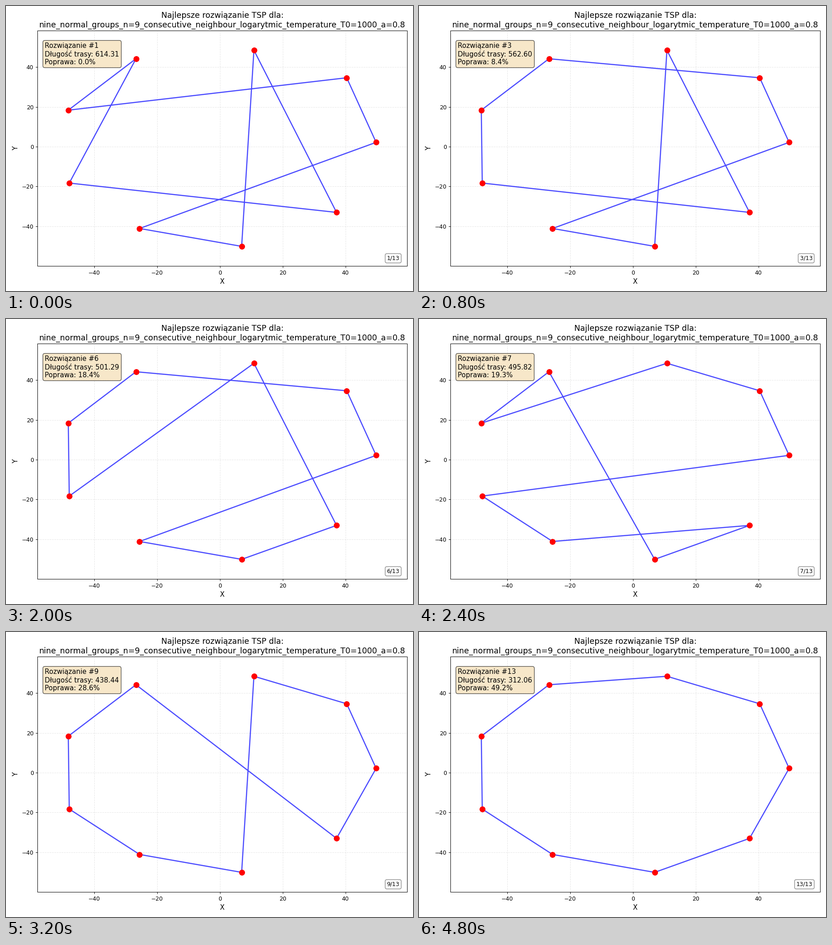
These frames come from a looping animation (894 px wide and 626 px high, 5.2 s). A matplotlib script:

```python
import matplotlib.pyplot as plt
from matplotlib.animation import FuncAnimation

W, H, DPI = 894, 626, 89.4
LEFT, RIGHT, TOP, BOTTOM = 69.2, 880.6, 54.2, 571.0  # plot area in pixels

CITIES = {
    "A": (-26.68, 44.15), "B": (-48.23, 18.33), "C": (-47.92, -18.27),
    "D": (-25.53, -41.07), "E": (6.96, -50.05), "F": (37.17, -33.0),
    "G": (49.77, 2.17), "H": (40.41, 34.6), "I": (10.87, 48.4),
}

# visiting order and tour length of each successive best solution
TOURS = [
    ("ABHGDEIFC", 614.31),
    ("ABCFEIDGH", 574.60),
    ("ABCFIEDGH", 562.60),
    ("ABCFIDEGH", 541.35),
    ("ABCIFDEGH", 510.50),
    ("ABCIFEDGH", 501.29),
    ("BAEFDCGHI", 495.82),
    ("ABEFDCGHI", 455.16),
    ("ABCDEIHGF", 438.44),
    ("ABCDEGHFI", 428.24),
    ("ABCDEGFHI", 378.94),
    ("ABDCEFGHI", 368.71),
    ("ABCDEFGHI", 312.06),
]

plt.rcParams["font.family"] = "DejaVu Sans"
fig, ax = plt.subplots(figsize=((W + 1e-6) / DPI, (H + 1e-6) / DPI), dpi=DPI)
fig.subplots_adjust(left=LEFT / W, right=RIGHT / W,
                    top=1 - TOP / H, bottom=1 - BOTTOM / H)

route, = ax.plot([], [], "b-", linewidth=2, alpha=0.7)
ax.plot(*zip(*CITIES.values()), "ro", markersize=9.4)
ax.margins(0.1)
ax.grid(True, linestyle="--", alpha=0.3)
ax.set_xlabel("X", fontsize=12)
ax.set_ylabel("Y", fontsize=12)
ax.set_title("Najlepsze rozwiązanie TSP dla:\n"
             "nine_normal_groups_n=9_consecutive_neighbour_"
             "logarytmic_temperature_T0=1000_a=0.8", fontsize=14)

info = ax.text(0.02, 0.95, "", transform=ax.transAxes, fontsize=12, va="top",
               bbox=dict(boxstyle="round", facecolor="wheat", alpha=0.7))
counter = ax.text(0.98, 0.02, "", transform=ax.transAxes, fontsize=10,
                  ha="right", va="bottom",
                  bbox=dict(boxstyle="round", facecolor="white", alpha=0.5))


def update(i):
    order, length = TOURS[i]
    route.set_data(*zip(*(CITIES[c] for c in order + order[0])))
    gain = 100 * (1 - length / TOURS[0][1])
    info.set_text(f"Rozwiązanie #{i + 1}\n"
                  f"Długość trasy: {length:.2f}\n"
                  f"Poprawa: {gain:.1f}%")
    counter.set_text(f"{i + 1}/{len(TOURS)}")
    return route, info, counter


anim = FuncAnimation(fig, update, frames=len(TOURS), interval=400,
                     init_func=lambda: update(0), repeat=True, repeat_delay=0)
plt.show()
```
